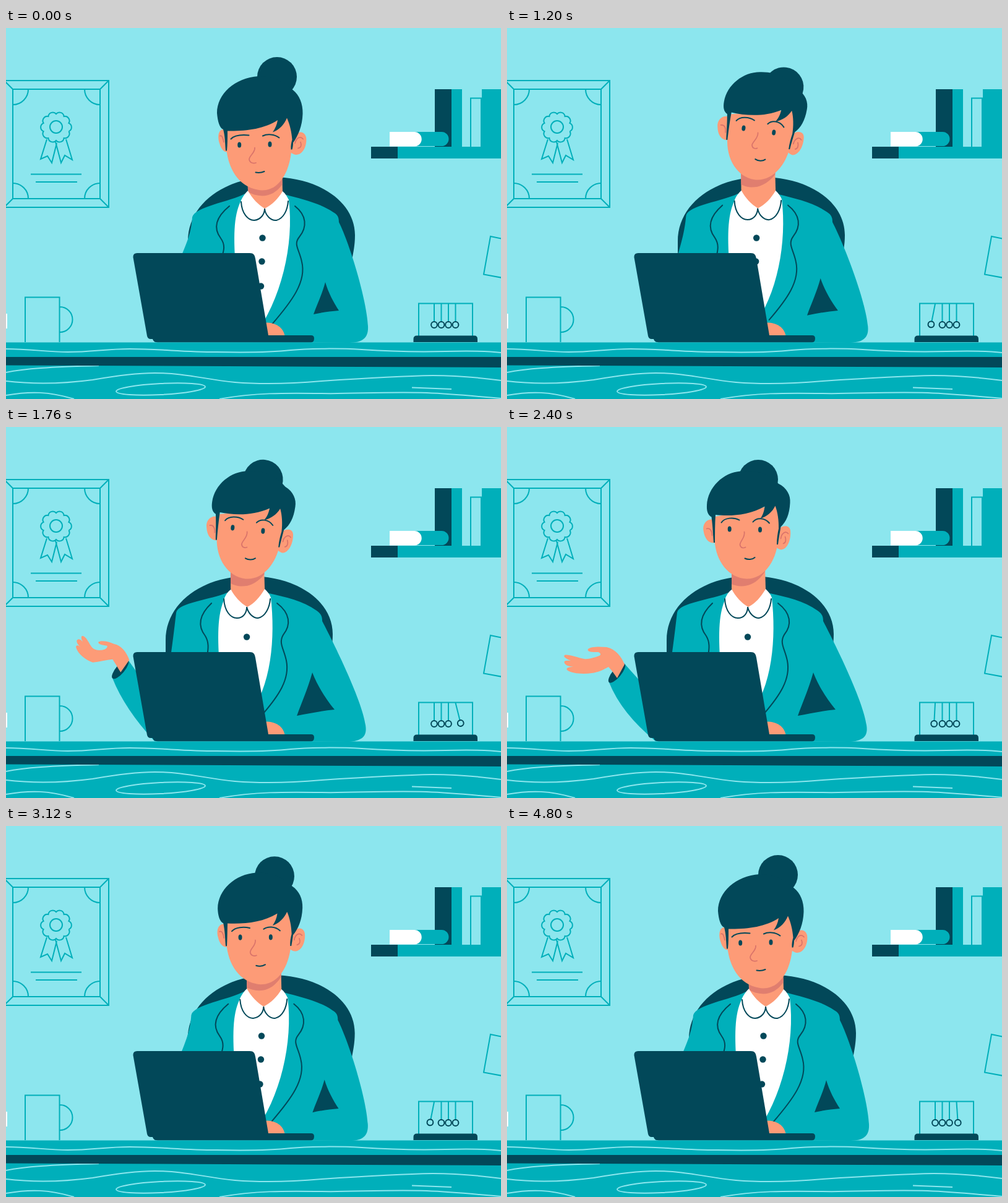
An HTML page that plays this animation: 800 px wide and 600 px high, repeating every 4.88 s.

```html
<!DOCTYPE html>
<html lang="en">
<head>
<meta charset="utf-8">
<title>At the desk</title>
<style>
  html, body { margin: 0; width: 100%; height: 100%; overflow: hidden; background: #8ce6ee; }
  svg { display: block; width: 100%; height: 100%; }
  .teal { fill: #00afba; }
  .dark { fill: #024859; }
  .white { fill: #fff; }
  .skin { fill: #fd9b77; }
  .line { fill: none; stroke: #00afba; stroke-width: 2; }
  .ink { fill: none; stroke: #024859; stroke-width: 2; stroke-linecap: round; }
  .crease { fill: none; stroke: #d9736a; stroke-width: 1.7; stroke-linecap: round; }
  .grain { fill: none; stroke: #8ce6ee; stroke-width: 2; }
</style>
</head>
<body>
<svg viewBox="0 0 800 600">
  <defs><clipPath id="neckClip"><path id="neckMask"/></clipPath></defs>

  <!-- certificate -->
  <g class="line">
    <path d="M-4 85H166V290H-4M11 99H152V276H11ZM166 85L152 99M152 276L166 290M-3 85L11 99M11 276L-3 290"/>
    <path d="M36 99A25 25 0 0 1 11 124M127 99A25 25 0 0 0 152 124M11 251A25 25 0 0 1 36 276M152 251A25 25 0 0 0 127 276"/>
    <path id="rosette"/>
    <circle cx="81" cy="160" r="10"/>
    <path d="M66 180L56 212L67 207L74 218L82 186M80 184L89 218L95 206L107 213L97 180M40 236.5H122M48 249H115"/>
  </g>

  <!-- shelf -->
  <path class="dark" d="M590 192H633V211H590ZM693 99H720V192H693Z"/>
  <path class="teal" d="M633 192H800V211H633ZM720 99H737V192H720ZM769 99H800V192H769ZM655 168H704A11.5 11.5 0 0 1 704 191H655Z"/>
  <path class="white" d="M620 168H660A11.7 11.7 0 0 1 660 191.5H620ZM0 462H2V486H0Z"/>
  <path class="line" d="M751 192V113.5H768V192M802 341L783 337L772 398.5L802 404M31 508V435.5H86.5V508M87 451A20.5 20.5 0 0 1 87 492"/>

  <!-- cradle -->
  <path class="line" d="M667 498V445.5H754V498"/>
  <g id="balls"></g>
  <path class="dark" d="M658.5 508V503Q658.5 497.5 664 497.5H757Q762 497.5 762 503V508Z"/>

  <!-- body -->
  <path id="chair" class="dark" d="M294 400V345C294 284 354 241 430 241C504 241 564 280 564 335C564 352 561 364 559 376L520 400Z"/>
  <path id="jacket" class="teal"/>
  <path id="gap" class="dark"/>
  <path id="lapelL" class="ink"/>
  <path id="lapelR" class="ink"/>
  <path id="shirt" class="white"/>
  <path id="collar" class="ink"/>
  <g id="buttons" class="dark">
    <circle cx="414.5" cy="339.5" r="5.2"/><circle cx="413.5" cy="377.5" r="5.2"/><circle cx="412" cy="417.5" r="5.2"/>
  </g>
  <path id="neck" class="skin"/>
  <g clip-path="url(#neckClip)"><path id="shade" fill="#e07e6f"/></g>

  <!-- raised arm -->
  <g id="arm">
    <path id="sleeve" class="teal"/>
    <ellipse id="cuff" class="dark" rx="19.5" ry="7"/>
    <path id="palm" class="skin"/>
  </g>

  <!-- head -->
  <g id="head">
    <circle id="bun" class="dark" r="32"/>
    <path id="earL" class="skin"/>
    <path id="earR" class="skin"/>
    <path id="earLines" class="crease"/>
    <path id="face" class="skin"/>
    <path id="hair" class="dark"/>
    <path id="nose" class="crease"/>
    <path id="brows" class="ink"/>
    <path id="mouth" class="ink"/>
    <ellipse id="eyeL" class="dark" rx="3"/>
    <ellipse id="eyeR" class="dark" rx="3"/>
  </g>

  <path id="typing" class="skin" d="M412 477C432 474 448 482 450.5 498H412Z"/>
  <path class="dark" d="M212 364H394C400 364 402 367 403 373L424 497H493Q498 497 498 502Q498 508 493 508.5H245Q238 508 237 503H234Q229 503 228 498L205.5 371Q205 364 212 364Z"/>

  <!-- desk -->
  <path class="teal" d="M0 508.5H800V600H0Z"/>
  <g class="grain">
    <path d="M0 519C40 519 65 524 100 524C140 524 160 519 200 519C250 519 285 524 340 524C390 525 425 525 460 521C490 518 540 518 575 520C620 523 670 524 710 523C750 522 775 522 800 525"/>
    <path d="M0 557C30 551 70 548 150 546M0 571C50 577 95 575 140 569C180 562 210 558 240 558C290 558 320 568 370 573C420 577 465 575 510 571C570 567 630 563 690 562C730 562 770 566 800 570"/>
    <path d="M0 594C40 587 70 588 110 600M345 600C400 590 450 590 510 591C560 592 610 588 680 590C730 592 770 597 800 599M656 581.5L720 584"/>
    <ellipse cx="250" cy="584" rx="72" ry="9" transform="rotate(-3 250 584)"/>
  </g>
  <path class="dark" d="M0 532H800V549L0 545.5Z"/>
</svg>

<script>
const LOOP = 4880, STEP = 80;
const $ = id => document.getElementById(id);
const set = (id, attrs) => { for (const k in attrs) $(id).setAttribute(k, attrs[k]); };

// Two poses per part: [bent over the keyboard, upright]
const body = {
  jacket: ["M386 268C362 281 305 289 301 306C299 335 292 348 270 400L240 508L555 509C578 509 586 500 585 482C583 440 556 350 538 314C538 306 536 302 529 298C507 283 479 277 450 269Z",
           "M357 268C332 279 278 284 275 300C272 325 270 345 262 400L240 508L555 509C576 507 584 500 581 482C576 445 535 360 511 314C511 306 509 302 502 297C480 281 452 275 425 269Z"],
  gap: ["M516 411C511 430 503 446 497 463C510 460 524 458 538 457C529 443 521 428 516 411Z",
        "M495 397C487 425 478 445 470 467C490 463 510 459 531 457C517 440 504 420 495 397Z"],
  lapelL: ["M361 288C344 302 332 320 347 340C355 351 352 360 349 370",
           "M332 285C314 302 308 320 322 338C328 348 327 358 325 370"],
  lapelR: ["M467 288C486 303 487 322 474 338C464 350 474 358 478 378C486 410 462 442 430 479",
           "M438 285C459 301 461 320 448 336C440 350 449 358 453 378C459 408 440 435 416 463"],
  shirt: ["M391 263C384 270 381 276 379 281C368 305 367 335 372 400L400 500C445 440 466 350 457 278C455 274 452 268 447 264Z",
          "M363 263C356 268 353 276 352 280C342 305 341 335 346 400L390 470C430 420 435 340 428 276C426 270 422 266 418 262Z"],
  collar: ["M380 281C381 300 391 311 401 311C412 310 418 301 418 292C419 303 428 312 437 311C449 308 455 294 456 280",
           "M352 278C353 298 363 309 373 309C384 309 389 300 389 291C391 301 399 309 407 309C419 307 426 292 427 278"],
  neck: ["M390 225L391 263C398 276 408 286 418 292C430 286 440 276 447 264L446 225Z",
         "M363 225L363 262C369 274 379 285 390 291C402 285 410 275 418 262L417 225Z"]
};

// Head parts, measured from the point between the eyes
const head = {
  hair: ["M-61 -51C-61 -82 -32 -108 6 -110.5C23 -110.5 43 -106 62 -88C72 -80 78 -66 77.5 -50C77 -30 70 -14 62 -3C62 2 61 6 60.5 8L58.5 8C58 2 59 -3 60.5 -8C59.5 -20 57 -32 52 -43C48 -33 39 -23 29 -20C33 -26 36 -32 37 -39.5C15 -25 -15 -21.5 -44 -22C-44 -10 -44 0 -45 10L-47 10C-48 -3 -48 -14 -51 -24.5C-57 -27 -60 -38 -61 -51Z",
         "M-61.5 -39C-60 -68 -35 -92 -7 -94C20 -97 40 -89 54 -74C68 -67 74 -55 73 -43C72 -24 67 -13 58 -4C56.5 5 54.5 15 53.5 24.5L51.5 24.5C51.5 15 53 6 54.5 -1C55 -14 53 -28 49 -38C45 -29 35 -20 25 -17.5C29 -23 31 -29 32 -37C5 -22 -25 -21 -47.5 -23.5C-48.5 -8 -48.5 7 -48.5 21.5L-50.5 21.5C-51.5 8 -52 -4 -54 -20C-60 -23 -62 -30 -61.5 -39Z"],
  face: ["M-49 -30L-46 5C-43 42 -23 72 12 74C38 74 55 48 59 12L60.5 -8L60 -45Z",
         "M-51 -20L-49 18C-47 52 -26 79 3 80C32 80 50 50 53 22L56 -2L52 -40Z"],
  earL: ["M-47 -24C-58 -27 -61 -15 -57 -2C-54 8 -50 12 -45 12Z",
         "M-50 -16C-62 -18 -69 -8 -67 2C-65 16 -58 23 -49 22Z"],
  earR: ["M58 -10C66 -22 80 -24 83 -12C85 0 79 17 66 16.5C62 16 60 14 57 12Z",
         "M50 4C58 -7 72 -9 73.5 2C75 18 68 33 58 33C54 32 52 30 49 28Z"],
  earLines: ["M65 -2C67 -10 73 -15 78 -9M70 6C75 5 76 1 74 -4M-56 -14C-53 -16 -51 -9 -50 -4",
             "M58 15C59 6 66 2 70 7M62 23C66 22 67 17 65 12M-62 -1C-56 -3 -53 3 -53 10"],
  nose: ["M0 5C1 13 -9 18 -9 24C-8 30 -2 31 2 29.5", "M-1 4C1 13 -8 19 -8 25C-7 30 -3 31 1 29"],
  brows: ["M-38.5 -9C-33 -15 -20 -16 -9.5 -15M13 -14C20 -17.5 32 -17 39.5 -11",
          "M-38 -11C-33 -19 -18 -20 -9 -15M13 -12C19 -19.5 32 -19 39.5 -10"],
  mouth: ["M1.5 45C7 46 12 45 15.5 43.5", "M0 47C5 49.5 12 49 16 45.5"]
};

// Hand seen from the wrist: [open, curled]
const palm = [
  "M7 -11C2 -24 -8 -36 -22 -39C-34 -40 -48 -40 -52 -36C-54 -32 -48 -31 -36 -31C-32 -30 -30 -27 -34 -25C-42 -22 -52 -19 -58 -20C-70 -22 -84 -28 -90 -26C-93 -23 -86 -20 -80 -17C-88 -18 -92 -17 -90 -13C-88 -9 -82 -8 -76 -7C-84 -7 -88 -5 -86 -2C-78 4 -60 5 -46 3C-36 2 -26 -3 -19 -7C-14 -2 -10 4 -5 11Z",
  "M9 -12C5 -24 -4 -36 -16 -38C-24 -42 -36 -44 -41 -41C-42 -38 -36 -36 -27 -35C-26 -33 -27 -31 -31 -29C-38 -27 -46 -27 -51 -32C-56 -38 -60 -50 -67 -51C-70 -49 -68 -45 -66 -41C-71 -47 -75 -46 -76 -43C-76 -39 -73 -36 -70 -33C-74 -37 -78 -36 -77 -32C-74 -22 -62 -12 -50 -8C-40 -9 -28 -12 -18 -13C-14 -7 -10 0 -5 8Z"
];

// Keys: [time, values...]
const keys = {
  body: [[680, 0], [1800, 1], [2800, 1], [3180, 0]],
  chair: [[640, 0], [1760, -36], [2800, -36], [3140, 0]],
  rise: [[640, 0], [1120, 1], [2840, 1], [3320, 0]],
  // x, tilt, bun offset x and y
  head: [[600, 402, 0, 0, 0], [1200, 407, 7, 10, 6], [1760, 391, 5, -4, -2], [2400, 384.5, 0, 0, 0],
         [2800, 384.5, 0, 0, 0], [3140, 403.5, 0, 0, 0], [3320, 402, 0, 0, 0]],
  // wrist x and y, curl
  arm: [[1360, 300, 470, 1], [1800, 188, 387, 1], [2320, 183, 395, 0],
        [2820, 183, 395, 0], [3100, 300, 470, 0]]
};

const lerp = (a, b, k) => a + (b - a) * k;
const ease = u => (1 - Math.cos(Math.PI * u)) / 2;

function at(rows, t) {
  if (t <= rows[0][0]) return rows[0].slice(1);
  const i = rows.findIndex(r => r[0] > t);
  if (i < 0) return rows[rows.length - 1].slice(1);
  const a = rows[i - 1], b = rows[i], u = ease((t - a[0]) / (b[0] - a[0]));
  return a.slice(1).map((v, j) => lerp(v, b[j + 1], u));
}

const NUM = /-?\d+(\.\d+)?/g;
function mix([a, b], k) {
  const to = b.match(NUM);
  let i = 0;
  return a.replace(NUM, v => lerp(+v, +to[i++], k).toFixed(2));
}

function buildRosette() {
  let d = "";
  for (let i = 0; i <= 10; i++) {
    const a = (i + 0.5) * Math.PI / 5;
    const p = `${81 + 21.5 * Math.cos(a)} ${160.5 + 21.5 * Math.sin(a)}`;
    d += i ? `A7.2 7.2 0 0 1 ${p}` : `M${p}`;
  }
  set("rosette", { d });
}

const ballX = [692, 703.5, 715, 726.5];
function buildBalls() {
  $("balls").innerHTML = ballX.map((x, i) =>
    `<g id="ball${i}"><path class="line" d="M${x} 446V475"/><circle class="ink" cx="${x}" cy="480" r="4.9"/></g>`).join("");
}

function swing(t) {
  const s = t < 40 ? 0 : Math.sin(Math.PI * (t - 40) / 480);
  set("ball0", { transform: `rotate(${11.5 * Math.max(0, s)} ${ballX[0]} 446)` });
  set("ball3", { transform: `rotate(${14.5 * Math.min(0, s)} ${ballX[3]} 446)` });
}

function drawBody(t) {
  const [k] = at(keys.body, t);
  for (const id in body) set(id, { d: mix(body[id], k) });
  set("neckMask", { d: mix(body.neck, k) });
  set("buttons", { transform: `translate(${-25.5 * k})` });
  set("chair", { transform: `translate(${at(keys.chair, t)[0]})` });
  const active = t < 480 || t > 3360 && t < 4800;
  const tap = active ? 1.5 * (1 - Math.cos(2 * Math.PI * t / 480)) : 0;
  set("typing", { transform: `translate(${tap} ${-tap / 2})` });
}

function drawArm(t) {
  const [x, y, curl] = at(keys.arm, t);
  set("sleeve", { d: `M${x + 7} ${y - 12}L${Math.max(x + 10, 250)} 450V508H240Q${x + 2} ${y + 68} ${x - 18} ${y + 18}Z` });
  set("cuff", { transform: `translate(${x - 5.5} ${y + 3}) rotate(-50)` });
  set("palm", { d: mix(palm, curl), transform: `translate(${x} ${y})` });
  set("arm", { display: t > 1360 && t < 3100 ? "inline" : "none" });
}

function drawHead(t) {
  const [k] = at(keys.rise, t);
  const [x, tilt, bx, by] = at(keys.head, t);
  const y = lerp(188.5, 165.5, k);
  for (const id in head) set(id, { d: mix(head[id], k) });
  set("head", { transform: `translate(${x} ${y}) rotate(${tilt})` });
  set("shade", { d: mix(head.face, k), transform: `translate(${x - 9 * k} ${y + lerp(9, 12, k)}) rotate(${tilt})` });
  set("bun", { cx: lerp(36, 21.5, k) + bx, cy: lerp(-109.5, -80.5, k) + by });
  const blink = Math.min(Math.abs(t - 320), Math.abs(t - 3680)) / 160;
  const ry = 4.6 * Math.min(1, Math.max(0.15, blink));
  set("eyeL", { cx: -24.8, cy: lerp(0.5, -0.5, k), ry });
  set("eyeR", { cx: 24.5, cy: lerp(-0.5, 0.5, k), ry });
}

function frame() {
  const t = Math.floor(performance.now() % LOOP / STEP) * STEP;
  swing(t);
  drawBody(t);
  drawArm(t);
  drawHead(t);
  requestAnimationFrame(frame);
}

buildRosette();
buildBalls();
frame();
</script>
</body>
</html>
```
